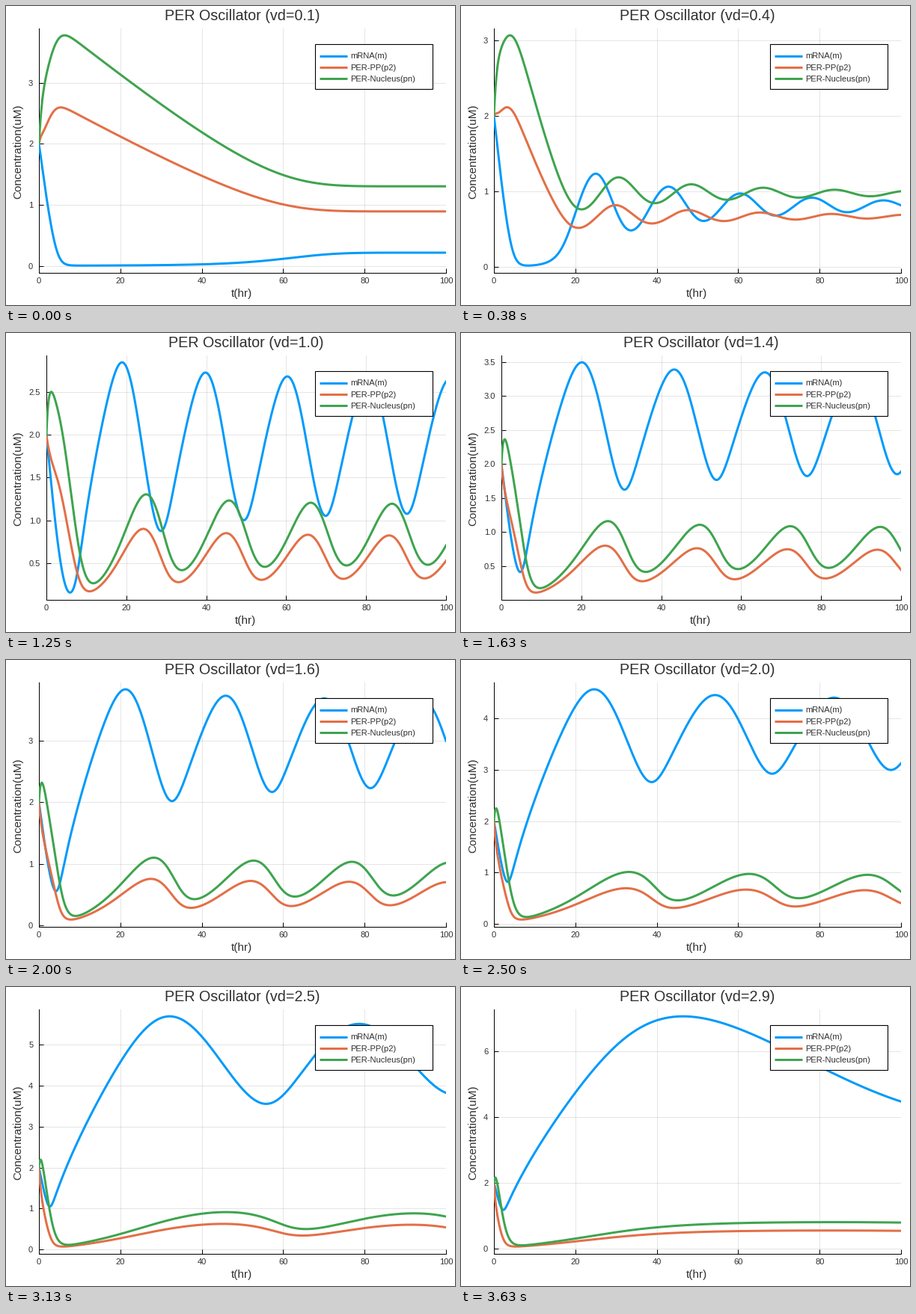
A matplotlib script that plays this animation: 600 px wide and 400 px high, repeating every 3760 ms.

```python
import numpy as np
import matplotlib.pyplot as plt
from matplotlib.animation import FuncAnimation
from matplotlib.patches import Rectangle

W, H, DPI = 600, 400, 100
LOOP, FRAMES = 3760, 30
TOP, BOTTOM, RIGHT = 30, 356.5, 588
INK = "#303030"
SERIES = [("mRNA(m)", "#009AFA"),
          ("PER-PP(p2)", "#E36F47"),
          ("PER-Nucleus(pn)", "#3EA44E")]

plt.rcParams.update({"font.family": "Liberation Sans", "font.size": 8,
                     "text.color": INK})


def hill(v, k, x):
    return v * x / (k + x)


def rates(u, vd):
    """Circadian PER model: transcription, two phosphorylations, nuclear transport."""
    m, p0, p1, p2, pn = u
    a = hill(3.2, 1, p0) - hill(1.58, 1, p1)
    b = hill(5, 1, p1) - hill(2.5, 1, p2)
    c = 1.9 * p2 - 1.3 * pn
    return np.array([0.76 / (1 + pn ** 4) - hill(0.65, 0.5, m),
                     0.38 * m - a,
                     a - b,
                     b - c - hill(vd, 0.2, p2),
                     c])


def solve(vd, t):
    """Runge-Kutta for all vd values at once; returns (time, species, vd)."""
    h = t[1] - t[0]
    u = np.outer([2, 0, 2, 2, 2], np.ones_like(vd))
    path = [u]
    for _ in t[1:]:
        k1 = rates(u, vd)
        k2 = rates(u + h / 2 * k1, vd)
        k3 = rates(u + h / 2 * k2, vd)
        k4 = rates(u + h * k3, vd)
        u = u + h / 6 * (k1 + 2 * k2 + 2 * k3 + k4)
        path.append(u)
    return np.array(path)[:, [0, 3, 4]]


def pick_ticks(lo, hi):
    """Choose the step that balances count, zero, coverage and roundness."""
    best = None
    for step, nice in ((0.5, 0.9), (1, 1), (2, 0.7)):
        ticks = np.arange(np.ceil(lo / step), np.floor(hi / step) + 1) * step
        n = len(ticks)
        if n < 4:
            continue
        score = (max(0, 1 - abs(n - 5) / 5) / 4 + (lo <= 0) / 6
                 + 0.5 * (hi - lo) / ((n - 1) * step) + nice / 4)
        if best is None or score > best[0]:
            best = score, step, ticks + 0.0
    return best[1:]


vds = np.arange(1, FRAMES + 1) / 10
time = np.linspace(0, 100, 2001)
data = solve(vds, time)

fig = plt.figure(figsize=(W / DPI, H / DPI), dpi=DPI, facecolor="white")
ax = fig.add_axes([0.1, 0.1, 0.8, 0.8])
ax.set_xlim(0, 100)
ax.set_xticks(range(0, 101, 20))
ax.set_axisbelow(True)
ax.grid(color="black", alpha=0.1, linewidth=0.72)
ax.spines[["top", "right"]].set_visible(False)
ax.spines[["left", "bottom"]].set_linewidth(0.72)
ax.tick_params(direction="in", length=4, width=0.72, labelcolor=INK)
ax.tick_params(axis="x", pad=4.5)
ax.tick_params(axis="y", pad=5.6)
curves = [ax.plot([], [], color=color, linewidth=2.16, zorder=3)[0]
          for _, color in SERIES]

# Overlay in stage pixels for the legend and the labels.
top = fig.add_axes([0, 0, 1, 1])
top.set(xlim=(0, W), ylim=(H, 0))
top.axis("off")
top.add_patch(Rectangle((412.5, 50.5), 157, 60, facecolor="white",
                        edgecolor="black", linewidth=0.8))
for i, (name, color) in enumerate(SERIES):
    y = 66.5 + 15.1 * i
    top.plot([418.5, 455.5], [y, y], color=color, linewidth=2.16,
             solid_capstyle="butt")
    top.text(460, y + 4, name, va="baseline")
title = top.text(0, 19, "", fontsize=14.2, ha="center", va="baseline")
xlabel = top.text(0, 389.5, "t(hr)", fontsize=11, ha="center", va="baseline")
top.text(16.5, 194.5, "Concentration(uM)", fontsize=11, rotation=90,
         ha="center", va="center")


def draw(i):
    y = data[:, :, i]
    for k, curve in enumerate(curves):
        curve.set_data(time, y[:, k])
    pad = 0.03 * np.ptp(y)
    lo, hi = y.min() - pad, y.max() + pad
    step, ticks = pick_ticks(lo, hi)
    digits = 1 if step < 1 else 0
    left = 54 if digits else 44
    ax.set_position([left / W, 1 - BOTTOM / H,
                     (RIGHT - left) / W, (BOTTOM - TOP) / H])
    ax.set_yticks(ticks, [f"{v:.{digits}f}" for v in ticks])
    ax.set_ylim(lo, hi)
    mid = (left + RIGHT) / 2 - 1
    title.set_x(mid + 1)
    title.set_text(f"PER Oscillator (vd={vds[i]:.1f})")
    xlabel.set_x(mid)
    return curves


anim = FuncAnimation(fig, draw, frames=FRAMES, interval=LOOP / FRAMES,
                     repeat=True, repeat_delay=0, blit=False)
plt.show()
```
